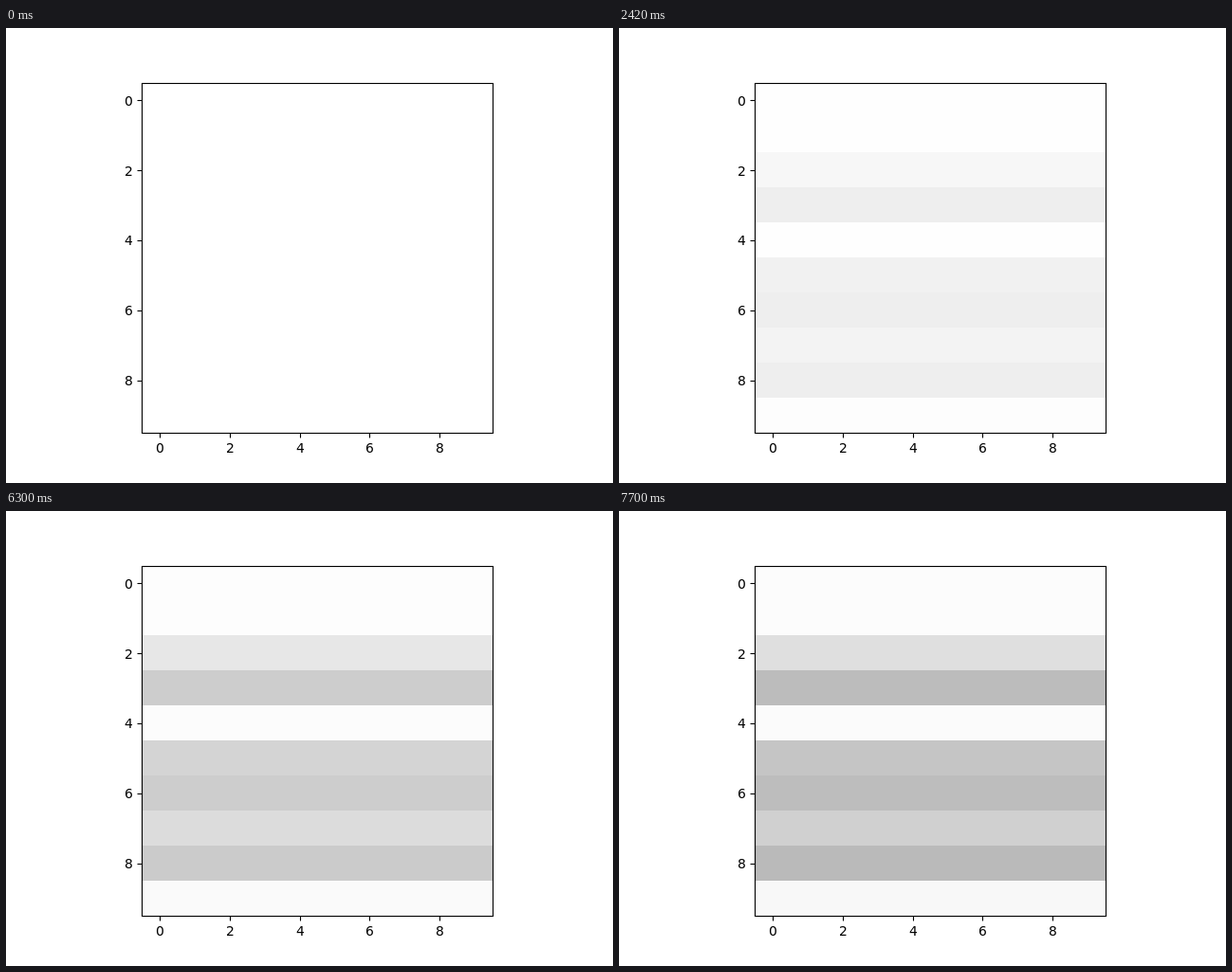
These frames come from a looping animation (640 px wide and 480 px high, 8 s). An HTML page with a canvas:

```html
<!DOCTYPE html>
<html lang="en">
<head>
<meta charset="utf-8">
<title>Row intensities</title>
<style>
  html, body { margin: 0; height: 100%; overflow: hidden; background: #fff; }
  canvas { display: block; }
</style>
</head>
<body>
<canvas id="stage" width="640" height="480"></canvas>
<script>
const ctx = document.getElementById("stage").getContext("2d");
const LOOP = 8000;
const LEFT = 143.5, TOP = 58.5, SIZE = 370, BOTTOM = 427.5;
const CELL = 36.96, ROW = 37;

// Each step darkens every row by its own rate, in grey levels
const stepTimes = [500, 3700, 6300, 7700];
const rates = [0.8, 0.7, 8.1, 16.7, 0.9, 14.4, 16.6, 11.8, 17.2, 1.8];

function line(x1, y1, x2, y2) {
  ctx.beginPath();
  ctx.moveTo(x1, y1);
  ctx.lineTo(x2, y2);
  ctx.stroke();
}

function drawRows(steps) {
  rates.forEach((rate, i) => {
    const level = Math.round(255 - rate * steps);
    ctx.fillStyle = `rgb(${level}, ${level}, ${level})`;
    ctx.fillRect(LEFT, 57 + ROW * i, SIZE, ROW);
  });
}

function drawAxes() {
  ctx.strokeStyle = ctx.fillStyle = "#000";
  ctx.lineWidth = 1.11;
  ctx.font = '13.89px "DejaVu Sans", sans-serif';
  ctx.strokeRect(LEFT, TOP, SIZE, BOTTOM - TOP);
  for (let n = 0; n < 10; n += 2) {
    const offset = CELL * (n + 0.5);
    const x = Math.round(143.2 + offset), y = 57.6 + offset;
    const tickX = x + 0.5, tickY = Math.round(y) + 0.5;
    line(tickX, BOTTOM, tickX, BOTTOM + 5);
    line(LEFT - 5, tickY, LEFT, tickY);
    ctx.fillText(n, x - 4, 448);
    ctx.fillText(n, 125, Math.round(y + 5.53));
  }
}

function draw() {
  const time = performance.now() % LOOP;
  ctx.fillStyle = "#fff";
  ctx.fillRect(0, 0, 640, 480);
  drawRows(stepTimes.filter(start => time >= start).length);
  drawAxes();
  requestAnimationFrame(draw);
}
draw();
</script>
</body>
</html>
```
